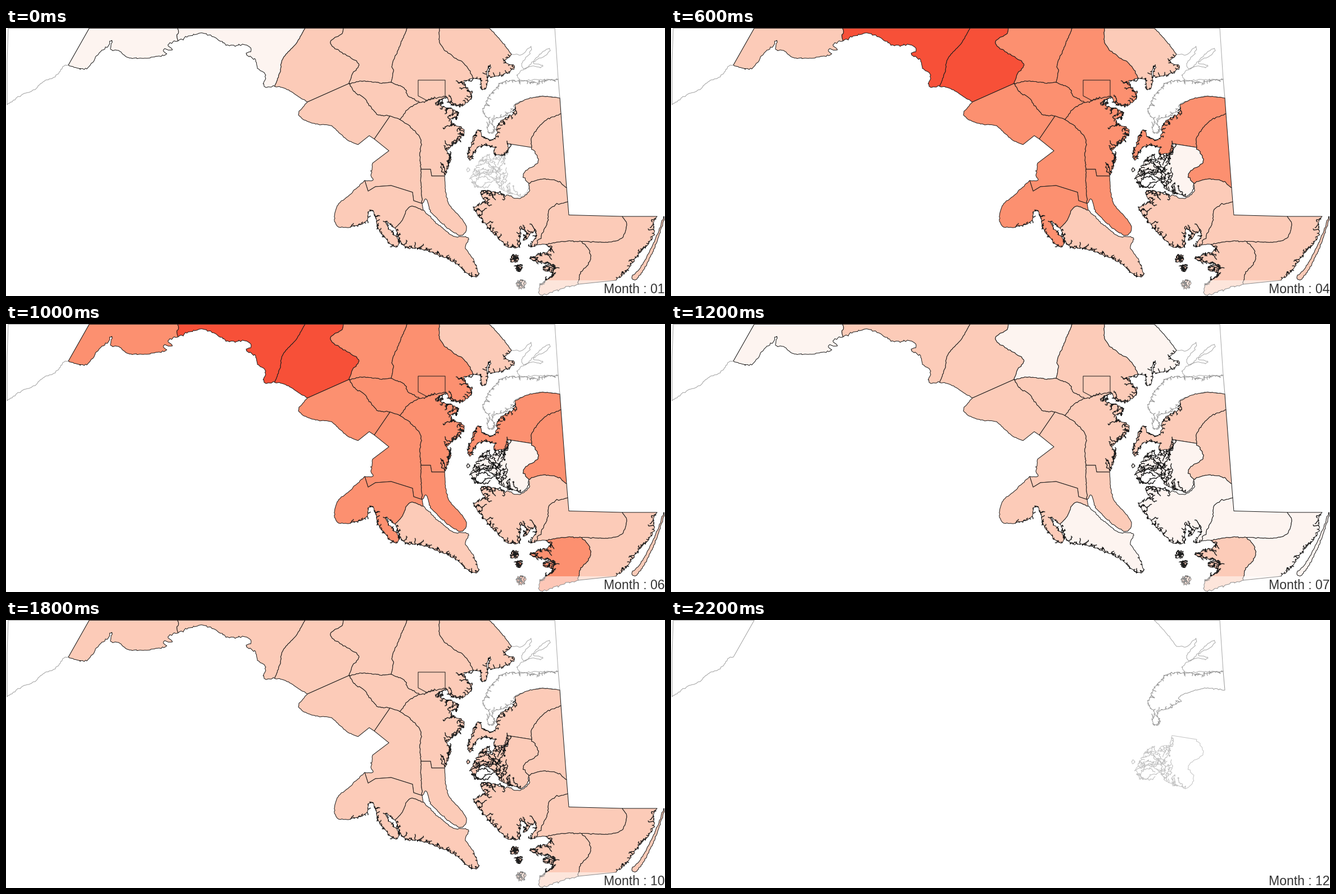
Write a matplotlib script that moves like this. It is 1172x478 px and loops after 2400 ms.

```python
import numpy as np
import matplotlib.pyplot as plt
from matplotlib.animation import FuncAnimation
from matplotlib.patches import Polygon, Rectangle

W, H, DPI = 1172, 478, 64
PX = 72 / DPI
INK = "#1c1c1c"
REDS = ["#fdf4f0", "#fccbb8", "#fc9070", "#f75038", "#c9181c", "#67000c"]
rng = np.random.default_rng(7)


def arc(rough, *xy):
    """Rough 0: straight legs. Otherwise a smooth curve with river-like jitter."""
    pts = np.array(xy, float).reshape(-1, 2)
    if not rough:
        return pts
    ends = np.vstack([pts[:1], pts, pts[-1:]])
    tan = ends[2:] - ends[:-2]
    tan /= np.hypot(*tan.T)[:, None]
    out = [pts[:1]]
    for a, b, u, v in zip(pts[:-1], pts[1:], tan[:-1], tan[1:]):
        size = np.hypot(*(b - a))
        n = max(2, int(size / 2.6))
        t = np.linspace(0, 1, n + 1)[1:, None]
        curve = (a * (2 * t**3 - 3 * t**2 + 1) + b * (3 * t**2 - 2 * t**3)
                 + size * (u * (t**3 - 2 * t**2 + t) + v * (t**3 - t**2)))
        curve[:-1] += rng.normal(0, rough, (n - 1, 2))
        out.append(curve)
    return np.vstack(out)


def creeks(coast, center, reach):
    """Crooked inlets that wander from a coast towards the middle of the land."""
    out = []
    for p in coast[1:-1:2]:
        p = p.copy()
        aim = np.arctan2(*(center - p)[::-1])
        for _ in range(2 + int(rng.random() * reach / 1.6)):
            out.append(p.copy())
            turn = aim + rng.normal(0, 1.1)
            p += 2.3 * np.array([np.cos(turn), np.sin(turn)])
        out.append([np.nan, np.nan])
    return np.array(out)


def islet(cx, cy, rx, ry):
    a = np.linspace(0, 2 * np.pi, 26)
    r = rng.uniform(.6, 1.1, (26, 1))
    return [cx, cy] + r * np.column_stack([rx * np.cos(a), ry * np.sin(a)])


# Shared borders: each is made once and reused by both neighbours.
ARCS = {
    "gal": arc(0, 148, 0, 111, 66),
    "gar": arc(.8, 111, 66, 103, 68, 88, 87, 66, 96, 50, 110, 27, 120, 2, 137),
    "alwa": arc(.7, 305, 0, 307, 7, 304, 12, 306, 23),
    "als": arc(.8, 306, 23, 288, 30, 296, 39, 280, 39, 286, 46, 272, 50, 250, 54, 215, 52,
               200, 40, 186, 38, 188, 22, 182, 32, 165, 46, 150, 66, 139, 74, 111, 66),
    "was": arc(1, 306, 23, 345, 9, 372, 17, 396, 31, 425, 30, 436, 38, 428, 47, 444, 57,
               447, 72, 462, 84, 459, 104, 478, 104),
    "wafr": arc(.4, 532, 0, 518, 25, 492, 56, 487, 80, 478, 104),
    "frs": arc(.5, 478, 104, 497, 108, 521, 123, 536, 132),
    "frmo": arc(0, 536, 132, 610, 99),
    "frca": arc(.6, 600, 0, 598, 10, 577, 25, 588, 38, 613, 53, 628, 66, 616, 82, 610, 99),
    "caho": arc(.5, 610, 99, 632, 95, 670, 98, 685, 97),
    "caba": arc(.4, 714, 0, 696, 42, 687, 66, 689, 78, 685, 97),
    "hoba": arc(.7, 685, 97, 708, 107, 714, 120, 735, 133),
    "homo": arc(.7, 610, 99, 622, 116, 636, 124, 650, 142, 662, 155, 683, 157),
    "hopg": arc(.5, 683, 157, 700, 163),
    "hoaa": arc(.6, 735, 133, 718, 142, 700, 163),
    "mopg": arc(0, 683, 157, 655, 198),
    "mos": arc(0, 655, 198, 646, 192, 626, 208),
    "mow": arc(.4, 626, 208, 606, 199, 590, 184, 577, 174, 556, 172, 535, 166, 520, 155,
               524, 146, 536, 132),
    "baha": arc(.6, 771, 0, 772, 28, 796, 52, 815, 64, 832, 90),
    "bac": arc(1.4, 832, 90, 815, 98, 828, 125, 795, 138, 783, 122),
    "baaa": arc(1, 783, 122, 760, 126, 735, 133),
    "hace": arc(.4, 859, 0, 878, 20, 899, 47),
    "hac": arc(.9, 899, 47, 888, 60, 904, 70, 878, 84, 858, 85, 861, 68, 855, 80, 857, 95,
               847, 110, 844, 92, 832, 90),
    "cec": arc(.7, 899, 47, 918, 47, 934, 35, 919, 71, 945, 52, 965, 37, 955, 52, 938, 62,
               955, 68, 935, 68, 910, 88, 945, 92, 982, 91),
    "ken": arc(1, 982, 91, 940, 96, 888, 95, 866, 113, 849, 150, 860, 165, 857, 182, 867, 187,
               866, 165, 885, 158, 908, 145),
    "kes": arc(.6, 908, 145, 903, 138, 930, 126, 957, 122, 985, 125),
    "qan": arc(.4, 985, 125, 957, 122, 930, 126, 905, 137),
    "qac": arc(1.2, 905, 137, 906, 147, 877, 171, 868, 197, 850, 196, 840, 182, 830, 200,
               823, 233, 838, 213, 870, 213, 868, 224, 893, 222, 891, 206),
    "qacr": arc(.5, 987, 153, 960, 165, 935, 195, 935, 213),
    "qata": arc(0, 935, 213, 891, 206),
    "crta": arc(.8, 935, 213, 946, 238, 920, 261, 930, 277),
    "crdo": arc(.5, 930, 277, 950, 270, 980, 273, 997, 285),
    "tad": arc(.7, 930, 277, 927, 292, 915, 301),
    "tac": arc(1.3, 915, 301, 882, 288, 866, 268, 848, 258, 830, 275, 838, 245, 851, 229,
               858, 240, 875, 225, 893, 222, 891, 206),
    "dowi": arc(.7, 999, 310, 968, 322, 963, 345, 955, 365, 943, 387),
    "dos": arc(1.2, 943, 387, 933, 391, 942, 364, 922, 378, 926, 366, 917, 357, 907, 392,
               868, 368, 842, 335),
    "dow": arc(1.3, 842, 335, 832, 320, 850, 310, 846, 292, 890, 298),
    "don": arc(.7, 890, 298, 912, 304, 930, 292, 930, 277),
    "wiwo": arc(.4, 1096, 336, 1104, 352, 1090, 378, 1024, 381),
    "wiso": arc(.6, 1024, 381, 1000, 380, 960, 386),
    "wic": arc(.6, 960, 386, 943, 387),
    "sowo": arc(.8, 1024, 381, 1036, 394, 1040, 412, 1020, 440, 1018, 457),
    "sos": arc(1, 1018, 457, 985, 466, 950, 476, 949, 458),
    "soc": arc(1.1, 949, 458, 972, 438, 955, 430, 970, 423, 933, 412, 950, 403, 968, 396,
               960, 386),
    "wob": arc(0, 1018, 457, 1085, 450),
    "woc": arc(1, 1085, 450, 1108, 428, 1128, 400, 1150, 374, 1152, 346, 1158, 336),
    "pgn": arc(0, 655, 198, 681, 219, 652, 241),
    "pgw": arc(.9, 652, 241, 650, 266, 653, 271, 638, 272),
    "pgch": arc(0, 638, 272, 644, 291, 657, 283, 685, 281, 723, 293, 725, 308, 740, 313),
    "pgaa": arc(.6, 700, 163, 727, 183, 738, 202, 736, 222, 738, 252),
    "pgcv": arc(.6, 738, 252, 738, 275, 740, 313),
    "aac": arc(1.4, 783, 122, 768, 132, 805, 152, 792, 166, 815, 185, 786, 217, 790, 237,
               780, 264),
    "aacv": arc(0, 738, 252, 755, 252, 757, 264, 780, 264),
    "cvc": arc(.5, 780, 264, 786, 310, 819, 354, 808, 370, 757, 330, 747, 305, 740, 313),
    "chw": arc(.5, 638, 272, 612, 297, 588, 320, 588, 352, 610, 356),
    "chs": arc(.8, 610, 356, 640, 345, 650, 325, 664, 360, 697, 388, 676, 348, 692, 357),
    "chsm": arc(.3, 742, 325, 718, 319, 704, 344, 692, 357),
    "smn": arc(.6, 742, 325, 768, 350, 798, 372, 822, 374, 817, 390, 832, 414),
    "sms": arc(.8, 832, 414, 836, 444, 798, 418, 745, 396, 708, 388, 692, 357),
}


def ring(names, *tail):
    """Join arcs end to end; a leading minus runs one backwards."""
    parts = [ARCS[n[1:]][::-1] if n[0] == "-" else ARCS[n] for n in names.split()]
    pts = np.vstack(parts + [np.array(tail, float).reshape(-1, 2)])
    pts[:, 1] = np.maximum(pts[:, 1], .5)
    return pts


GARRETT = ring("gal gar", 2, 60, 4, 0)
KENT = ring("ken kes")
COUNTIES = {
    "Al": ring("alwa als -gal"),
    "Wa": ring("alwa was -wafr"),
    "Fr": ring("wafr frs frmo -frca"),
    "Ca": ring("frca caho -caba"),
    "Ba": ring("baha bac baaa -hoba -caba"),
    "Ha": ring("hace hac -baha"),
    "Ce": ring("hace cec", 979, 45, 976, 0),
    "Mo": ring("frmo homo mopg mos mow"),
    "Ho": ring("caho hoba hoaa -hopg -homo"),
    "AA": ring("hoaa pgaa aacv -aac baaa"),
    "PG": ring("hopg pgaa pgcv -pgch -pgw -pgn -mopg"),
    "Cv": ring("aacv cvc -pgcv"),
    "Ch": ring("pgch chsm -chs -chw"),
    "SM": ring("smn sms -chsm"),
    "QA": ring("qan qac -qata -qacr"),
    "Cr": ring("qacr crta crdo"),
    "Ta": ring("crta tad tac -qata"),
    "Do": ring("crdo dowi dos dow don"),
    "Wi": ring("dowi -wic -wiso -wiwo", 1001, 333.5),
    "So": ring("-wiso sowo sos soc"),
    "Wo": ring("wiwo sowo wob woc"),
}
ISLANDS = {
    "Do": [islet(905, 411, 8, 8)],
    "So": [islet(912, 428, 6, 7), islet(916, 457, 9, 9)],
    "Ta": [islet(822, 253, 3, 4)],
    "Wo": [arc(.5, 1170, 336, 1154, 378, 1128, 428, 1113, 446, 1122, 448, 1150, 400, 1171, 342)],
}
# Broken coasts and how far their inlets reach inland.
COASTS = {
    "Ba": ("bac", 14), "Ha": ("hac", 4), "AA": ("aac", 26), "Ch": ("chs", 6),
    "SM": ("sms", 9), "QA": ("qac", 9), "Ta": ("tac", 36), "Do": ("dos", 11),
    "So": ("soc", 16), "Wo": ("woc", 8),
}
# Each month: usual level, then the counties that stand apart from it.
MONTHS = [
    (1, {0: "Al Wa", None: "Ce Ta"}),
    (1, {None: "Ce Ta"}),
    (1, {0: "SM Ta Wo", 2: "Al Wa Fr Mo Ho AA PG QA"}),
    (2, {0: "Ta", 1: "Al Ha SM Do Wi So Wo", 3: "Wa Fr", None: "Ce"}),
    (3, {1: "SM Ta Wo", 2: "Ha Do Wi So", 4: "Ca", 5: "Wa Fr", None: "Ce"}),
    (2, {0: "Ta", 1: "Ha SM Do Wi Wo", 3: "Wa Fr", None: "Ce"}),
    (1, {0: "Al Ca Ha SM Ta Do Wi Wo", None: "Ce"}),
    (1, {2: "Al", None: "Ce"}),
    (1, {2: "AA PG Cv Ch QA Cr So", None: "Ce"}),
    (1, {None: "Ce"}),
    (2, {1: "Wa Ca Ha Ce SM Wi Wo", None: "Ta"}),
    (None, {}),
]


def level(month, name):
    usual, apart = MONTHS[month]
    return next((lv for lv, group in apart.items() if name in group.split()), usual)


fig = plt.figure(figsize=(W / DPI, H / DPI), dpi=DPI, facecolor="white")
ax = fig.add_axes([0, 0, 1, 1])
ax.set_xlim(0, W)
ax.set_ylim(H, 0)
ax.axis("off")


def shape(pts, edge, z):
    return ax.add_patch(Polygon(pts, closed=True, fc="white", ec=edge, lw=PX,
                                joinstyle="round", zorder=z))


def stroke(pts, color, z, width=1):
    return ax.plot(*pts.T, color=color, lw=width * PX, zorder=z)[0]


fills, lines = {}, {}
for name, pts in COUNTIES.items():
    parts = [pts] + ISLANDS.get(name, [])
    fills[name] = [shape(p, INK, 3) for p in parts]
    inlets = [creeks(p, p.mean(0), 9) for p in parts[1:] if name in ("Do", "So")]
    if name in COASTS:
        coast, reach = COASTS[name]
        inlets.append(creeks(ARCS[coast], (pts.min(0) + pts.max(0)) / 2, reach))
    lines[name] = [stroke(p, INK, 4, 1.4) for p in inlets]
lines["Do"].append(stroke(creeks(ARCS["dow"], np.array([880, 312]), 20), INK, 4, 1.4))
city = np.array([[762, 126], [748, 129], [733, 121], [733, 93], [781, 93], [781, 122]])
lines["Ba"].append(stroke(city, INK, 4))

# Grey outlines that stay visible when there is no value.
for pts, grey in ((GARRETT, "#a0a0a0"), (COUNTIES["Ce"], "#aaaaaa"), (KENT, "#989898"),
                  (COUNTIES["Ta"], "#c4c4c4"), (ISLANDS["Ta"][0], "#c4c4c4")):
    shape(pts, grey, 1)
stroke(creeks(ARCS["ken"], np.array([880, 140]), 7), "#989898", 2, 1.2)
stroke(lines["Ta"][0].get_xydata(), "#c4c4c4", 2, 1.2)

ax.add_patch(Rectangle((0, 450), W, 28, fc="white", ec="none", alpha=.5, zorder=5))
label = ax.text(1117, 473, "", ha="center", va="baseline", family="Liberation Sans",
                size=23 * PX, color="#333333", zorder=6)


def update(month):
    for name in COUNTIES:
        lv = level(month, name)
        for artist in fills[name] + lines[name]:
            artist.set_visible(lv is not None)
        if lv is not None:
            for patch in fills[name]:
                patch.set_facecolor(REDS[lv])
    label.set_text(f"Month : {month + 1:02d}")
    return [label]


anim = FuncAnimation(fig, update, frames=12, interval=200, repeat=True, repeat_delay=0,
                     blit=False)
plt.show()
```
